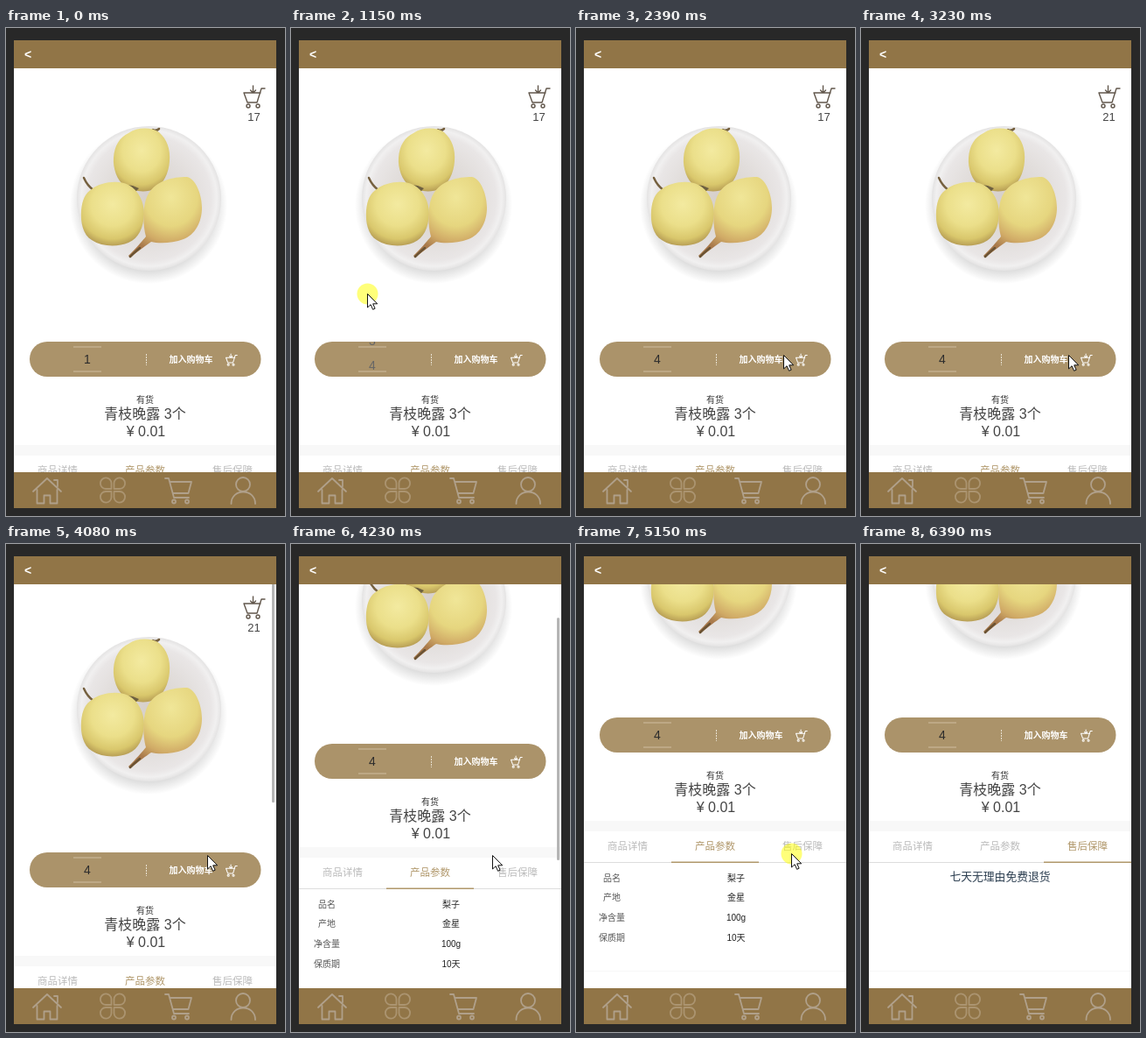
Recreate the animation shown at these times as an HTML page. Size 319 px wide and 557 px high, loop 6.67 s.

```html
<!DOCTYPE html>
<html lang="zh-CN">
<head>
<meta charset="utf-8">
<style>
html, body { margin: 0; width: 100%; height: 100%; overflow: hidden; background: #282828; }
svg { display: block; }
text { font-family: "Liberation Sans", "Noto Sans CJK SC", "Noto Sans CJK", sans-serif; text-anchor: middle; }
.line { fill: none; stroke-linecap: round; stroke-linejoin: round; }
</style>
</head>
<body>
<svg width="319" height="557" viewBox="0 0 319 557">
  <defs>
    <clipPath id="view"><rect x="9" y="46" width="300" height="462"/></clipPath>
    <clipPath id="slot"><rect x="70" y="358" width="46" height="40"/></clipPath>
    <radialGradient id="plate">
      <stop offset="0" stop-color="#d6cfca"/><stop offset=".6" stop-color="#e2dedc"/>
      <stop offset=".86" stop-color="#e9e6e6"/><stop offset=".94" stop-color="#f1f0f0"/>
      <stop offset="1" stop-color="#e4e3e3"/>
    </radialGradient>
    <radialGradient id="shade">
      <stop offset=".8" stop-color="#999" stop-opacity=".4"/><stop offset="1" stop-color="#999" stop-opacity="0"/>
    </radialGradient>
    <radialGradient id="pear" cx=".5" cy=".35" r=".68">
      <stop offset="0" stop-color="#f3eaa0"/><stop offset=".5" stop-color="#ebdf8a"/>
      <stop offset=".8" stop-color="#d9c76c"/><stop offset="1" stop-color="#b09550"/>
    </radialGradient>
    <radialGradient id="ripe" cx=".58" cy=".25" r=".72">
      <stop offset="0" stop-color="#f0e698"/><stop offset=".5" stop-color="#e6d67f"/>
      <stop offset=".78" stop-color="#d0aa66"/><stop offset="1" stop-color="#a97a4c"/>
    </radialGradient>
    <g id="cart" class="line">
      <path d="M25 3h-4l-5 16H5L1 8h19M11.500 0v8m-3-3 3 3 3-3"/>
      <circle cx="6" cy="23" r="2"/><circle cx="17" cy="23" r="2"/>
    </g>
    <path id="petal" d="M-1.500-1.500h-6.500a6.300 6.300 0 1 1 6.500-6.500z"/>
  </defs>

  <rect x="9" y="14" width="300" height="534" fill="#fff"/>
  <g clip-path="url(#view)">
    <g id="page">
      <circle cx="163" cy="202" r="90" fill="url(#shade)"/>
      <circle cx="163.500" cy="194.500" r="82.500" fill="url(#plate)"/>
      <path class="line" d="M168 116q4 2 7-1M89 171q4 9 11 14" stroke="#75603f" stroke-width="2.500"/>
      <path d="M140 120C150 113 166 113 175 119C184 127 188 138 187 152C186 166 180 178 170 184C160 188 146 187 136 181C127 174 122 160 123 148C124 134 130 125 140 120z" fill="url(#pear)"/>
      <path d="M138 179l7 1 7 3-4 4-8-3z" fill="#6d6040"/>
      <path d="M98 184C108 176 128 173 140 179C152 185 158 200 158 212C157 228 152 240 140 245C128 250 110 250 98 242C88 236 85 222 86 208C87 196 91 188 98 184z" fill="url(#pear)"/>
      <path d="M160 238C156 224 156 200 163 189C172 174 190 170 207 170C217 172 224 190 224 205C224 222 216 236 203 241C190 246 174 246 166 244C160 248 152 254 142 262L140 260C148 252 156 243 160 238z" fill="url(#ripe)"/>
      <path class="line" d="M142 261q5-5 11-10" stroke="#6b5334" stroke-width="2.500"/>

      <use href="#cart" x="271" y="66" stroke="#62574c" stroke-width="1.400"/>
      <text id="count" x="283.500" y="106" font-size="13" fill="#444"></text>

      <rect x="27" y="358" width="264.500" height="40" rx="20" fill="#ab936a"/>
      <g clip-path="url(#slot)"><g id="wheel" font-size="14"></g></g>
      <path d="M77 364h32M77 392h32" stroke="#c3b08e" stroke-width="1.500"/>
      <path d="M160.500 372v13" stroke="#e8e0d0" stroke-dasharray="2 1"/>
      <use href="#cart" transform="translate(251 372) scale(.53)" stroke="#fff" stroke-width="1.900"/>

      <rect x="9" y="476" width="300" height="12" fill="#f8f8f8"/>
      <path d="M9 523.500h300" stroke="#ddd"/>
      <path id="underline" d="M109 523.300h100" stroke="#b0976a" stroke-width="1.400"/>
      <path d="M9 647.500h300" stroke="#f8f8f8"/>
      <g id="labels"></g>
      <g id="specs"></g>
      <g id="service"></g>
    </g>
    <rect id="bar" x="304" width="3" height="277" rx="1.500" fill="#b5b5b5"/>
  </g>

  <rect x="9" y="14" width="300" height="32" fill="#917547"/>
  <text x="25" y="35" font-size="14" font-weight="bold" fill="#fff">&lt;</text>
  <rect x="9" y="507" width="300" height="41" fill="#917547"/>
  <g class="line" stroke="#b0a08a" stroke-width="1.800">
    <path d="M31 529l16-15 16 15M35.500 527v15.500h8v-9h7v9h8V527M55 516h4v7"/>
    <g id="clover" transform="translate(122 527.500)" stroke="#ab9470"></g>
    <path d="M182 514h4l6 22h17M187 518h25l-3.500 13H191"/>
    <circle cx="192" cy="540.500" r="2"/><circle cx="207" cy="540.500" r="2"/>
    <circle cx="271" cy="521" r="8"/>
    <path d="M257.500 543c0-18 27.500-18 27.500 0"/>
  </g>

  <g id="cursor">
    <circle id="press" r="12" fill="#ff0" fill-opacity=".52"/>
    <path d="M0 0v15.500l3.600-3.300 2.500 5.600 2.500-1.100-2.400-5.400h5z" fill="#fff" stroke="#111"/>
  </g>
</svg>
<script>
const $ = id => document.getElementById(id);
const LOOP = 6670, STEP = 77.06, START = 60;
const ITEM = 28;

// y is the middle of the glyphs
const label = (s, x, y, size, fill, extra = "") =>
  `<text x="${x}" y="${y + size * .37}" font-size="${size}" fill="${fill}" ${extra}>${s}</text>`;

$("labels").innerHTML =
  label("加入购物车", 211.5, 378, 10, "#fff", 'font-weight="bold"') +
  label("有货", 159, 424, 10, "#333") +
  label("青枝晚露 3个", 159, 440, 16, "#444") +
  label("¥ 0.01", 160, 460.5, 16, "#444") +
  ["商品详情", "产品参数", "售后保障"].map((s, i) =>
    label(s, 59 + 100 * i, 505, 11.5, "#bbb", 'class="tab"')).join("");

$("specs").innerHTML = [["品名", "梨子"], ["产地", "金星"], ["净含量", "100g"], ["保质期", "10天"]]
  .map(([key, value], i) => {
    const y = 541 + 22.6 * i;
    return label(key, 41, y, 10, "#555") + label(value, 183, y, 10, "#222");
  }).join("");
$("service").innerHTML = label("七天无理由免费退货", 159, 539, 12.8, "#2c3e50");

$("wheel").innerHTML = [1, 2, 3, 4, 5].map((n, i) => label(n, 93, 378 + ITEM * i, 14, "#333")).join("");
$("clover").innerHTML = [0, 90, 180, 270].map(a => `<use href="#petal" transform="rotate(${a})"/>`).join("");

const tabs = [...document.querySelectorAll(".tab")];
const digits = [...$("wheel").children];

const path = [
  [65, 306, 546], [250, 250, 510], [480, 140, 420], [680, 91, 381], [760, 91, 381],
  [900, 89, 360], [1140, 87, 303], [1380, 89, 301], [1460, 105, 307], [1760, 272, 376],
  [1910, 237, 373], [3610, 237, 373], [3765, 236, 348], [3920, 236, 348], [3995, 230, 355],
  [4610, 230, 355], [4765, 217, 359], [4850, 217, 359], [5070, 246, 353], [5230, 246, 353],
  [5390, 268, 355], [5780, 268, 355], [6310, 303, 546]
];
const scroll = [[3995, 0], [4074, 5], [4228, 130], [4229.5, 130], [4306, 160]];
const wheel = [[760, 0], [900, 22], [1143, 77], [1300, 84]];
const barFade = [[3990, 0], [3995, 1], [4610, 1], [4690, .6], [4765, .3], [4850, .3], [4915, 0]];

// linear interpolation through [time, ...values]
function at(keys, t) {
  const i = keys.findIndex(k => k[0] > t);
  if (i < 0) return keys[keys.length - 1].slice(1);
  if (!i) return keys[0].slice(1);
  const a = keys[i - 1], b = keys[i], p = (t - a[0]) / (b[0] - a[0]);
  return a.slice(1).map((v, j) => v + (b[j + 1] - v) * p);
}

const show = (id, on) => $(id).style.display = on ? "" : "none";
const within = (t, a, b) => t >= a && t < b;

function draw(t) {
  const [x, y] = at(path, t).map(Math.round);
  show("cursor", within(t, 65, 6370));
  $("cursor").setAttribute("transform", `translate(${x + .5} ${y + .5})`);
  show("press", within(t, 750, 1290) || within(t, 1900, 2060) || within(t, 5060, 5230));

  const top = Math.round(at(scroll, t)[0]);
  $("page").setAttribute("transform", `translate(0 ${-top})`);
  $("bar").setAttribute("y", 15 + .53 * top);
  $("bar").setAttribute("opacity", at(barFade, t)[0]);

  const turn = at(wheel, t)[0];
  $("wheel").setAttribute("transform", `translate(0 ${-turn})`);
  digits.forEach((d, i) => d.setAttribute("fill", Math.abs(ITEM * i - turn) < 4 ? "#2c2c2c" : "#666"));
  $("count").textContent = t < 2840 ? 17 : 21;

  const active = t < 5220 ? 1 : 2;
  tabs.forEach((tab, i) => tab.setAttribute("fill", i === active ? "#b0976a" : "#bbb"));
  $("underline").setAttribute("transform", `translate(${100 * (active - 1)} 0)`);
  show("specs", active === 1);
  show("service", active === 2);
}

const begin = performance.now();
function tick() {
  const t = (performance.now() - begin) % LOOP;
  draw(t < START ? 0 : START + 8 + STEP * Math.floor((t - START) / STEP));
  requestAnimationFrame(tick);
}
tick();
</script>
</body>
</html>
```
